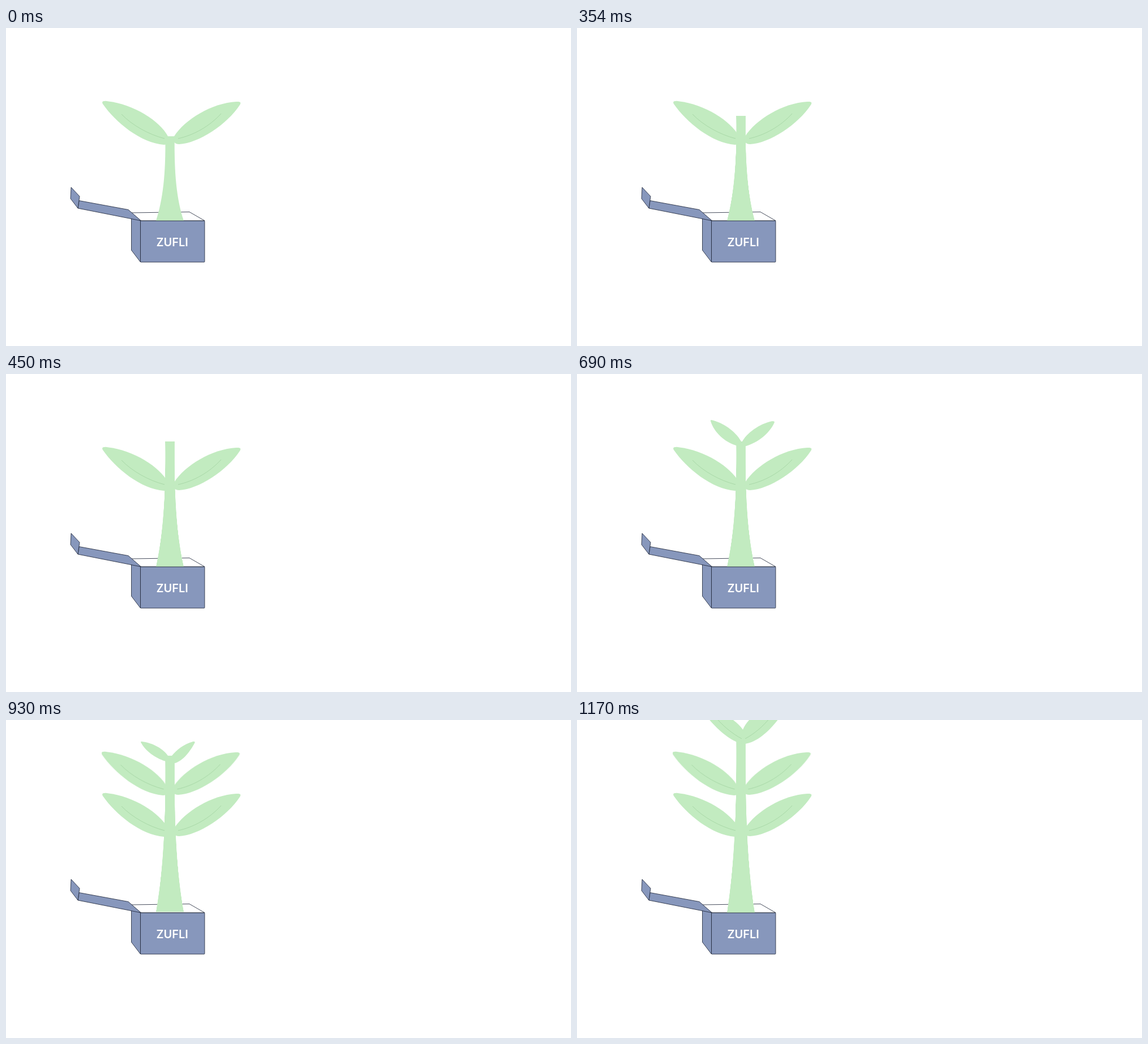
An HTML page for the animation above (1290 ms loop, 998 by 561 pixels).

```html
<!DOCTYPE html>
<html lang="en">
<head>
<meta charset="utf-8">
<title>Growing plant</title>
<style>
  html, body { margin: 0; width: 100%; height: 100%; overflow: hidden; background: #fff; }
  svg { display: block; width: 100vw; height: 100vh; }
  .plant { fill: #c2ebc0; }
  .vein { fill: none; stroke: #a3d3a1; stroke-width: 0.8; }
  .box { fill: #8797bc; stroke: #182033; stroke-width: 0.8; stroke-linejoin: round; }
  .open { fill: #fff; }
  .brand { font: 600 20px Inter, Roboto, sans-serif; fill: #fff; text-anchor: middle; }
  .late { opacity: 0; }
</style>
</head>
<body>
<svg viewBox="0 0 998 561">
  <defs>
    <g id="pair">
      <path class="plant" d="M171 134C168 129 173 128.5 178 129C225 134 272 164 286 191C290 199 286 206 279 206C238 203 193 166 171 134Z"/>
      <path class="plant" d="M413.500 135C416 130 412 130 407 130C364 132 315 162 297 191C294 199 297 205 306 205C340 203 390 171 413.500 135Z"/>
      <path class="vein" d="M204 152C222 171 252 188 280 195M380 151C360 173 332 189 304 195"/>
    </g>
  </defs>

  <g class="box">
    <path class="open" d="M221 326L324 324.5L351 340H238Z"/>
    <path d="M221.5 334L237.5 340V413L221.5 392Z"/>
    <path d="M129 304.5L216 320.5L238.5 340L127 318Z"/>
    <path d="M115 281L130 297L127 318L114 301Z"/>
  </g>

  <path id="stem" class="plant" d="M281.3 -100C282.5 -55 277 -25 265 0H314C301.5 -25 297 -55 297.8 -100Z"/>
  <use href="#pair"/>

  <rect class="box" x="237.5" y="340.200" width="113.4" height="72.8" rx="1"/>
  <text class="brand" x="293.7" y="384.7">ZUFLI</text>

  <g id="bud" class="plant late">
    <path d="M236 83C235 81 238 81 241 82C262 88 283 104 291 121C292 126 287 128 281 126C261 120 242 103 236 83Z"/>
    <path d="M348.5 86C350 83 346 83 343 83.5C323 88 299 104 291 121C289 126 293 128 299 127C319 121 340 105 348.5 86Z"/>
  </g>

  <use id="upper" class="late" href="#pair" x="-1.5" y="-73"/>

  <g id="tip" class="plant late">
    <path d="M238.5 40C237 37.5 240 38 243 38.5C260 41 278 51 286 63C289 70 287 74 281 72.5C263 67 246 54 238.5 40Z"/>
    <path d="M333 41C335 38 332 37.5 329 38.5C315 42 301 53 293 63C290 72 292 77 299 76C314 71 326 54 333 41Z"/>
  </g>

  <g id="crown" class="late">
    <path class="plant" d="M214 -30C229 0 264 35 290 41.5L298 30L293 17C285 5 270 -5 245 -20Z"/>
    <path class="plant" d="M374 -30C357 2 326 38 297 42C288 42 288 30 293 17C298 5 309 -8 330 -20Z"/>
    <path class="vein" d="M243 -7C257 10 274 24 291 33M343 -7C330 11 312 25 297 33"/>
  </g>
</svg>
<script>
  const LOOP = 1290;
  const $ = id => document.getElementById(id);

  // steps: [start in ms, style value], each held until the next
  function hold(id, prop, steps) {
    const frames = steps.map(([ms, value]) => ({ [prop]: value, offset: ms / LOOP, easing: 'step-end' }));
    frames.push({ [prop]: steps[steps.length - 1][1], offset: 1 });
    $(id).animate(frames, { duration: LOOP, iterations: Infinity }).startTime = 0;
  }

  function show(id, from, to = LOOP) {
    const steps = [[0, 0], [from, 1]];
    if (to < LOOP) steps.push([to, 0]);
    hold(id, 'opacity', steps);
  }

  const grow = (top, base = 340) => `translate(0px, ${base}px) scale(1, ${(base - top) / 100})`;

  hold('stem', 'transform', [
    [0, grow(191)],
    [210, grow(155)],
    [450, grow(119)],
    [930, grow(63, 338.5)],
    [1170, grow(27)]
  ]);
  show('bud', 690, 930);
  show('upper', 930);
  show('tip', 930, 1170);
  show('crown', 1170);
</script>
</body>
</html>
```
